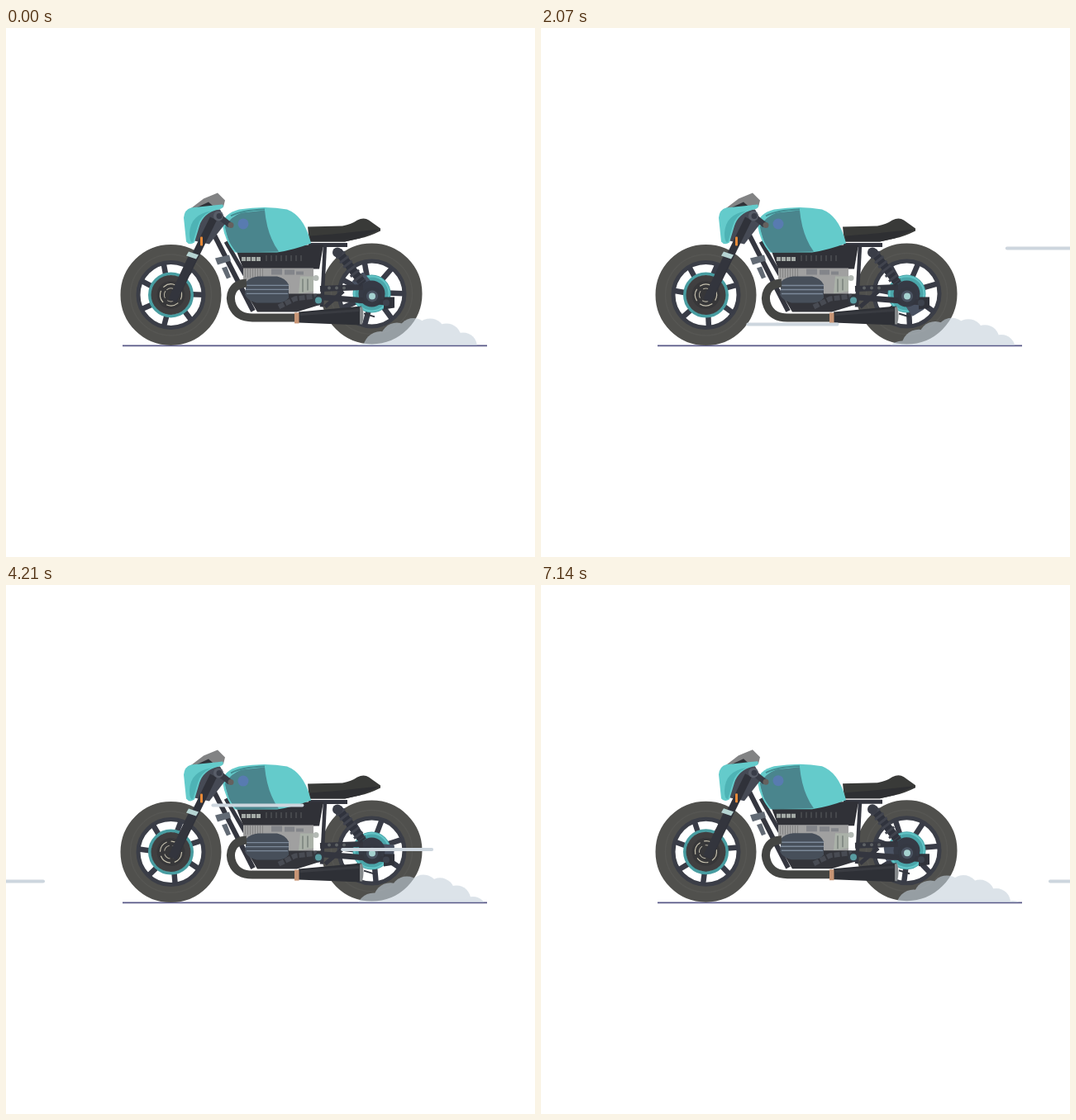
An HTML page for the animation above (7.21 s loop, 640 by 640 pixels).

```html
<!DOCTYPE html>
<html lang="en">
<head>
<meta charset="utf-8">
<title>Motorcycle ride</title>
<style>
  html, body { margin: 0; width: 100%; height: 100%; overflow: hidden; background: #fff; }
  svg { display: block; width: 100%; height: 100%; }
</style>
</head>
<body>
<svg viewBox="0 0 640 640" fill="none">
  <defs>
    <clipPath id="aboveGround"><path d="M400 300H582V384H400Z"/></clipPath>
    <g id="tire">
      <circle r="51" stroke="#50504d" stroke-width="20"/>
      <circle r="49" stroke="#565653" stroke-width="1.5"/>
      <circle r="39.5" stroke="#3b3e47" stroke-width="5"/>
    </g>
  </defs>

  <path d="M141 384.3H582" stroke="#585887" stroke-width="1.8"/>

  <g id="bike">
    <!-- rear wheel -->
    <g transform="translate(442.5 321)">
      <use href="#tire"/>
      <g class="spokes"></g>
      <circle r="19" stroke="#4aa6aa" stroke-width="8"/>
      <circle r="21" stroke="#63c5c7" stroke-width="2"/>
      <g class="spin"><rect x="12" y="-9" width="15" height="18" rx="2" fill="#4a5262"/></g>
      <circle r="16" fill="#363a45"/>
    </g>

    <!-- front wheel -->
    <g transform="translate(199.5 322.5)">
      <use href="#tire"/>
      <g class="spokes"></g>
      <circle r="25.5" stroke="#489da1" stroke-width="4"/>
      <circle r="24" fill="#403f40"/>
      <circle r="17" fill="#373739"/>
      <g class="spin">
        <circle r="13" stroke="#c5c0ae" stroke-width="1.2" stroke-dasharray="15 5"/>
        <circle r="8" stroke="#b5b1a2" stroke-dasharray="9 4"/>
      </g>
    </g>

    <!-- frame and swingarm -->
    <g stroke="#34363f" stroke-linejoin="round">
      <path d="M252 250L299 342" stroke-width="6"/>
      <path d="M266 258L290 300" stroke-width="5"/>
      <path d="M366 262H413" stroke-width="5"/>
      <path d="M386 262L382 337" stroke-width="4.5"/>
      <path d="M380 315L432 313M378 325L468 332" stroke-width="7"/>
      <path d="M386 337L408 318M330 338L358 320" stroke-width="5"/>
      <path d="M433 345L446 349" stroke-width="2"/>
    </g>
    <path d="M253 278L270 274L272 281L256 286ZM261 290L267 288L272 301L267 303Z" fill="#626a74"/>
    <path d="M457 325H470V338L457 340Z" fill="#30323a"/>
    <path d="M402 270L432 309" stroke="#30333d" stroke-width="10"/>
    <path d="M404 273L430 307" stroke="#41444e" stroke-width="13" stroke-dasharray="3 4"/>
    <circle cx="401" cy="271" r="6" fill="#3a3d47"/>
    <circle cx="443" cy="324" r="11" fill="#353943"/>
    <circle cx="443" cy="324" r="7" fill="#4a5361"/>
    <circle cx="443" cy="324" r="4" fill="#a5d2d0"/>
    <circle cx="460" cy="332" r="4" fill="#3d424d"/>

    <!-- engine -->
    <path d="M276 262H384L379 291H287Z" fill="#303137"/>
    <path d="M285 279H308" stroke="#a4aaa6" stroke-width="5" stroke-dasharray="5 1"/>
    <path d="M314 278H358" stroke="#45474b" stroke-width="7" stroke-dasharray="2 4"/>
    <path d="M287 290H372V322H338L287 306Z" fill="#a0a0a0"/>
    <path d="M289 296H313" stroke="#858585" stroke-width="11" stroke-dasharray="1 2"/>
    <path d="M321 291H334V298H321ZM337 292H349V298H337ZM351 294H360V298H351Z" fill="#83858a"/>
    <path d="M356 300H372V318L354 321Z" fill="#aab1a8"/>
    <path d="M359 303V319M365 303V317" stroke="#858d87" stroke-width="2"/>
    <circle cx="375" cy="302" r="3.5" fill="#b4bab5"/>
    <path d="M291 321H381V334L352 343H304Z" fill="#33343a"/>
    <path d="M330 337L350 327L376 324" stroke="#484b53" stroke-width="6" stroke-dasharray="7 2"/>
    <circle cx="378" cy="329" r="6" fill="#343a43"/>
    <circle cx="378" cy="329" r="4" fill="#599ca1"/>
    <g fill="#5e6265">
      <circle cx="391" cy="314" r="2"/><circle cx="400" cy="314" r="2"/><circle cx="409" cy="314" r="2"/>
    </g>
    <path d="M291 306Q296 301 305 300H328Q338 302 342 310V326Q338 332 327 332H303Q292 329 289 322Z" fill="#474f5a"/>
    <path d="M290 311H342M290 316H342M291 321H341" stroke="#7c8999" stroke-width="1.4"/>

    <!-- exhaust -->
    <path d="M291 308C273 309 269 324 274 336Q280 350 298 350H352" stroke="#444543" stroke-width="10"/>
    <path d="M354 343L430 336V359L354 356Z" fill="#2e3036"/>
    <path d="M356 346L427 341" stroke="#393b41" stroke-width="3"/>
    <path d="M428 337H431Q434 347 431 358H428Z" fill="#85898b"/>
    <rect x="349" y="344" width="5.5" height="13" fill="#c89575"/>

    <!-- seat -->
    <path d="M365 240L407 239Q418 237 425 232Q433 228 439 232L453 242V245Q439 252 428 254L410 258H367Z" fill="#393a38"/>
    <path d="M368 251Q408 248 423 246L452 243L428 254L410 258H368Z" fill="#2e2f32"/>

    <!-- tank -->
    <path d="M262 238Q263 224 282 219Q314 214 340 219Q361 227 369 260Q348 268 328 271H277Q265 258 262 238Z" fill="#64cbcb"/>
    <path d="M265 240Q271 228 285 223L313 220Q316 251 330 270L279 271Q267 258 265 240Z" fill="#4a858d"/>
    <path d="M263 239Q266 243 269 257L277 271Q267 261 263 239Z" fill="#67cfce"/>
    <path d="M272 227Q284 220 313 219" stroke="#438d92" stroke-width="2"/>
    <circle cx="287" cy="236.5" r="6.5" fill="#587bb0"/>

    <!-- fork and fairing -->
    <path d="M235 219H259L267 234L246 261L228 257Z" fill="#464a55"/>
    <path d="M251 230L202 330" stroke="#30323a" stroke-width="9"/>
    <path d="M226 276L201 329" stroke="#33353d" stroke-width="10"/>
    <path d="M218 275L221 270L233 274L230 279Z" fill="#b6d4d2"/>
    <path d="M222 219L239 206L256 199L265 208L263 216L243 219Z" fill="#828384"/>
    <path d="M230 217L245 210L253 217Z" fill="#303238"/>
    <path d="M215 229Q216 219 224 217L262 213Q265 217 258 219Q239 223 234 239L228 259Q222 263 218 258Z" fill="#64cbcb"/>
    <path d="M222 248Q223 225 248 221Q235 227 232 239L226 259Q222 259 222 248Z" fill="#4eb3b5"/>
    <rect x="235" y="252" width="3" height="11" rx="1" fill="#e88a38"/>
    <path d="M256 226L271 238" stroke="#373a44" stroke-width="7"/>
    <circle cx="257" cy="227" r="6" fill="#585d68"/>
    <circle cx="258" cy="227" r="3.5" fill="#393d48"/>
    <circle cx="272" cy="238" r="3.5" fill="#65605e"/>
  </g>

  <g id="smoke" fill="#c6d2dc" opacity=".6" clip-path="url(#aboveGround)"></g>
  <g id="streaks" stroke="#cdd6de" stroke-width="4" stroke-linecap="round"></g>
</svg>
<script>
const LOOP = 7210, SHOWN_FPS = 14, DRAWN_FPS = 25;
const find = selector => [...document.querySelectorAll(selector)];

function add(parent, tag, attributes) {
  const node = document.createElementNS(parent.namespaceURI, tag);
  set(node, attributes);
  return parent.appendChild(node);
}

function set(node, attributes) {
  for (const name in attributes) node.setAttribute(name, attributes[name]);
}

for (const group of find('.spokes'))
  for (let i = 0; i < 7; i++)
    add(group, 'path', {
      d: 'M18 0L39 2', stroke: '#393c47', 'stroke-width': 6.5,
      transform: `rotate(${i * 360 / 7 + 24})`
    });

const spinning = find('.spokes, .spin');
const [bike] = find('#bike'), [smoke] = find('#smoke'), [streakLayer] = find('#streaks');
const puffs = Array.from({ length: 8 }, () => add(smoke, 'rect', {}));

// Each streak crosses once every 30 steps, beginning at its own step.
const streaks = [[231, 0], [266.5, 9], [320, 6], [358.5, 15]].map(([y, start]) =>
  ({ start, node: add(streakLayer, 'path', { d: `M2 ${y}H110` }) }));

function draw(step) {
  const bob = 0.4 + 0.5 * Math.sin(step * Math.PI * 2 / 15);
  set(bike, { transform: `translate(0 ${bob})` });
  for (const node of spinning) set(node, { transform: `rotate(${-130 - step * 121})` });

  for (const { start, node } of streaks) {
    const x = -117.2 + 52.23 * ((step - start + 30) % 30);
    set(node, { transform: `translate(${x} 0)` });
  }

  puffs.forEach((puff, i) => {
    const x = 433 + i * 20 + step * 2 % 20;
    const life = Math.min(1, (x - 431) / 142);
    const height = 33.5 * Math.max(0, Math.sin(Math.PI * life)) ** 0.9;
    const radius = 21 - (x - 450) * 0.04;
    set(puff, { x: x - radius, y: 384 - height, width: radius * 2, height: height + 44, rx: radius });
  });
}

function tick() {
  const time = performance.now() % LOOP;
  const shown = Math.floor((time + 5) * SHOWN_FPS / 1000) % 101;
  draw(Math.ceil(shown * DRAWN_FPS / SHOWN_FPS));
  requestAnimationFrame(tick);
}
tick();
</script>
</body>
</html>
```
